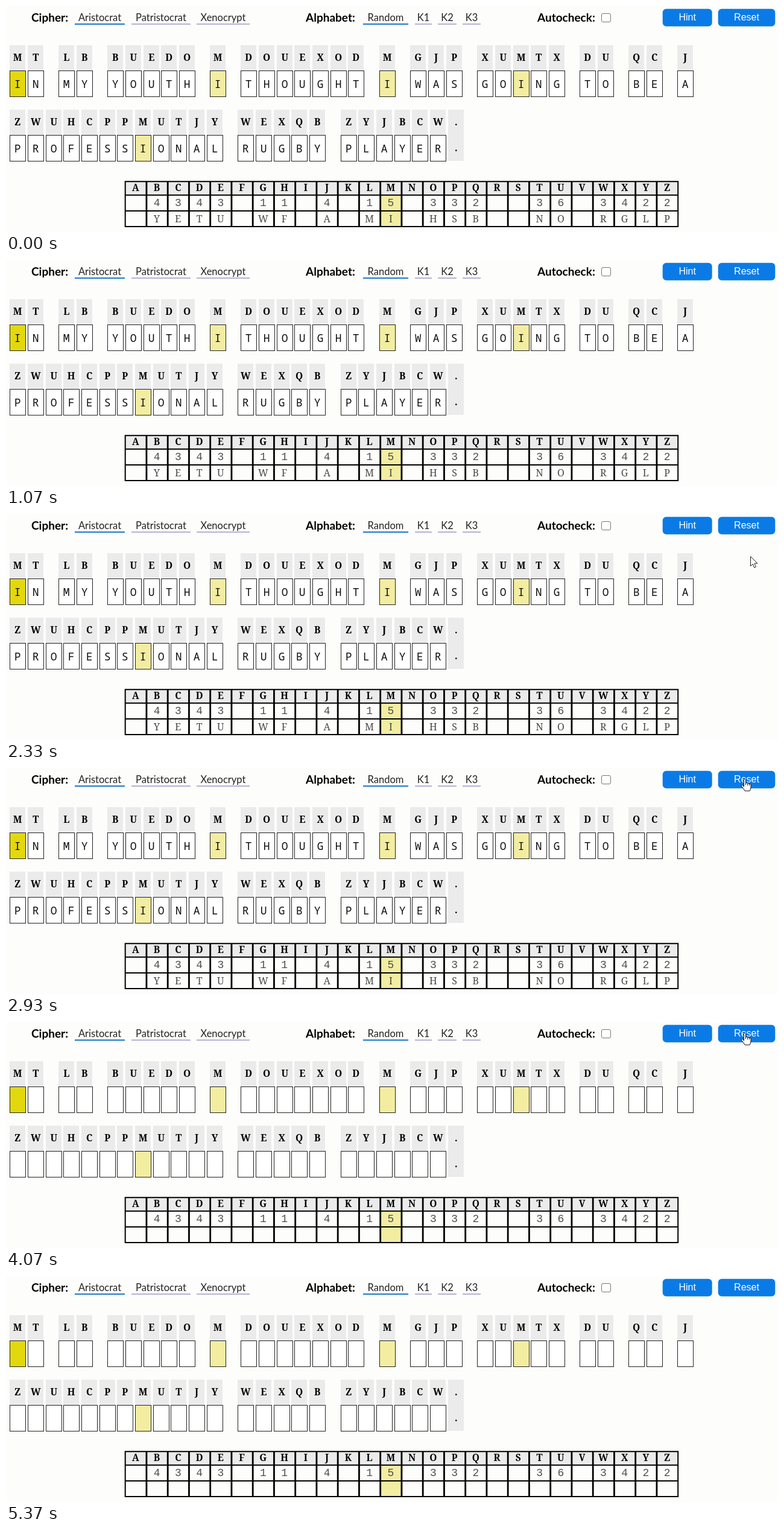
An HTML page for the animation above (5.41 s loop, 1280 px wide and 375 px high).

```html
<!DOCTYPE html>
<html lang="en">
<head>
<meta charset="utf-8">
<title>Cipher solver</title>
<style>
  html, body { margin: 0; width: 100%; height: 100%; overflow: hidden; background: #fdfdfc; }
  svg { display: block; width: 1280px; height: 375px; }
  text { text-anchor: middle; fill: #111; }
  .label { font: 700 19px Lato, sans-serif; text-anchor: start; fill: #000; }
  .option { font: 400 16.5px Lato, sans-serif; fill: #222; }
  .button { font: 16px "Liberation Sans", Arial, sans-serif; fill: #fff; }
  .cipher { font: 700 15.5px "Noto Serif", serif; fill: #000; }
  .plain { font: 18px "Noto Sans Mono", "DejaVu Sans Mono", monospace; }
  .count { font: 18px "Liberation Mono", monospace; fill: #505050; }
  .guess { font: 300 16px "Noto Serif", serif; fill: #484848; }
</style>
</head>
<body>
<svg id="stage" viewBox="0 0 1280 375"></svg>
<script>
const LOOP = 5410, RESET_AT = 3230;
const GRAY = '#ebebeb', BLUE = '#0a7be6', PALE = '#f2eda1', ACTIVE = '#e3d80e';
const LETTERS = 'ABCDEFGHIJKLMNOPQRSTUVWXYZ';
const PITCH = 29.67;

// Each word: left edge, ciphertext, plaintext
const lines = [
  { top: 65, words: [
    [6.3, 'MT', 'IN'], [87.3, 'LB', 'MY'], [168.3, 'BUEDO', 'YOUTH'], [338.3, 'M', 'I'],
    [389.3, 'DOUEXOD', 'THOUGHT'], [619.3, 'M', 'I'], [670.3, 'GJP', 'WAS'],
    [781.2, 'XUMTX', 'GOING'], [950.9, 'DU', 'TO'], [1031.9, 'QC', 'BE'], [1112.5, 'J', 'A']] },
  { top: 172, words: [
    [6.3, 'ZWUHCPPMUTJY', 'PROFESSIONAL'], [384.4, 'WEXQB', 'RUGBY'],
    [554.7, 'ZYJBCW.', 'PLAYER.']] }
];

const stage = document.getElementById('stage');

function add(parent, tag, attrs, content) {
  const node = document.createElementNS('http://www.w3.org/2000/svg', tag);
  for (const key in attrs) node.setAttribute(key, attrs[key]);
  if (content !== undefined) node.textContent = content;
  parent.appendChild(node);
  return node;
}
const box = (x, y, width, height, fill, more) =>
  add(stage, 'rect', { x, y, width, height, fill, ...more });
const write = (parent, kind, x, y, content) =>
  add(parent, 'text', { class: kind, x, y }, content);

function drawToolbar() {
  write(stage, 'label', 42, 26, 'Cipher:');
  write(stage, 'label', 497, 26, 'Alphabet:');
  write(stage, 'label', 881, 26, 'Autocheck:');
  const options = [
    ['Aristocrat', 114, 197, true], ['Patristocrat', 208, 306], ['Xenocrypt', 316, 404],
    ['Random', 592, 667, true], ['K1', 678, 706], ['K2', 716, 747], ['K3', 757, 787]
  ];
  for (const [name, left, right, chosen] of options) {
    write(stage, 'option', (left + right) / 2, 25, name);
    box(left, 29, right - left, 2, chosen ? '#1f78c8' : '#b8b1d3');
  }
  box(987.5, 12.5, 15, 14, '#fff', { rx: 2.5, stroke: '#767676' });
  for (const [name, left, width] of [['Hint', 1088.7, 82], ['Reset', 1180.7, 94.6]]) {
    box(left, 4.7, width, 29, BLUE, { rx: 6 });
    write(stage, 'button', left + width / 2, 24, name);
  }
}

function drawPuzzle(answers, counts, key) {
  lines.forEach(({ top, words }, row) => {
    for (const [start, cipher, plain] of words) {
      [...cipher].forEach((letter, i) => {
        const x = Math.round(start + i * PITCH), mid = x + 13.2;
        const isLetter = LETTERS.includes(letter);
        box(x, top, 26, isLetter ? 42 : 85, GRAY);
        write(stage, 'cipher', mid, top + 26, letter);
        if (!isLetter) {
          write(stage, 'cipher', mid, top + 69, letter);
          return;
        }
        const first = row === 0 && start < 10 && i === 0;
        const fill = letter !== 'M' ? '#fff' : first ? ACTIVE : PALE;
        box(x + .5, top + 42.5, 26, 43, fill, { stroke: '#222' });
        write(answers, 'plain', mid, top + 71, plain[i]);
        counts[letter] = (counts[letter] || 0) + 1;
        key[letter] = plain[i];
      });
    }
  });
}

function drawTable(answers, counts, key) {
  const left = 197.7, width = 35.25, right = left + 26 * width;
  box(left, 291, right - left, 23, GRAY);
  box(left + 12 * width, 314, width, 52, PALE);
  let grid = '';
  for (let i = 1; i < 26; i++) grid += `M${left + i * width} 291V366`;
  add(stage, 'path', { d: grid, stroke: '#000', 'stroke-width': 2.8 });
  add(stage, 'path', {
    d: `M${left} 291.3H${right}V366H${left}ZM${left} 313.7H${right}M${left} 340H${right}`,
    fill: 'none', stroke: '#000', 'stroke-width': 2
  });
  [...LETTERS].forEach((letter, i) => {
    const mid = left + (i + .5) * width - .5;
    write(stage, 'cipher', mid, 307, letter);
    if (!counts[letter]) return;
    write(stage, 'count', mid, 332, counts[letter]);
    write(answers, 'guess', mid, 358.5, key[letter]);
  });
}

const answers = add(stage, 'g', {});
const counts = {}, key = {};
drawToolbar();
drawPuzzle(answers, counts, key);
drawTable(answers, counts, key);
stage.appendChild(answers);

const pointer = add(stage, 'g', { 'stroke-linejoin': 'round' });
const arrow = add(pointer, 'path', {
  d: 'M.5 .5V16.5L4.2 13L6.7 19L9.4 17.8L6.9 12H12Z', fill: '#fff', stroke: '#222'
});
const hand = add(pointer, 'g', { fill: '#fff', stroke: '#111' });
add(hand, 'path', {
  d: 'M-1.5 13V1.5Q-1.5 0 0 0T1.5 1.5V7Q3 5.5 4.5 7.5Q6 6.5 7.3 8.3' +
     'Q10 7.6 10 10V14Q10 17 8 20H0Q-2 16-5.5 12.5Q-6.5 10.5-4.5 10.2Q-3 10.5-1.5 13Z'
});
add(hand, 'path', { d: 'M1.5 7V10M4.5 8V11M7.3 8.5V11', fill: 'none' });

// Pointer route: time, x, y
const route = [
  [1430, 1198, 378], [1770, 1211, 275], [2080, 1241, 165], [2330, 1234, 70],
  [2620, 1225, 18], [4080, 1225, 18], [4330, 1267, -24]
];

// Smooth path through the stops, with zero speed at rests and at both ends.
function slope(i, axis) {
  const before = route[i - 1], here = route[i], after = route[i + 1];
  if (!before || !after) return 0;
  const a = here[axis] - before[axis], b = after[axis] - here[axis];
  return a * b <= 0 ? 0 : (a + b) / (after[0] - before[0]);
}

function along(t, axis) {
  const i = route.findIndex((stop, n) => n < route.length - 1 && t < route[n + 1][0]);
  const from = route[i], to = route[i + 1], span = to[0] - from[0];
  const u = (t - from[0]) / span, v = 1 - u;
  return v * v * (1 + 2 * u) * from[axis] + u * u * (3 - 2 * u) * to[axis] +
    span * u * v * (v * slope(i, axis) - u * slope(i + 1, axis));
}

const show = (node, on) => node.setAttribute('display', on ? 'inline' : 'none');

function render(t) {
  show(answers, t < RESET_AT);
  const moving = t >= route[0][0] && t < route[route.length - 1][0];
  show(pointer, moving);
  if (!moving) return;
  const x = along(t, 1), y = along(t, 2);
  const hovering = x > 1181 && x < 1275 && y > 5 && y < 33;
  show(arrow, !hovering);
  show(hand, hovering);
  pointer.setAttribute('transform', `translate(${Math.round(x)} ${Math.round(y)})`);
}

const begin = performance.now();
function tick() {
  render((performance.now() - begin) % LOOP);
  requestAnimationFrame(tick);
}
tick();
</script>
</body>
</html>
```
